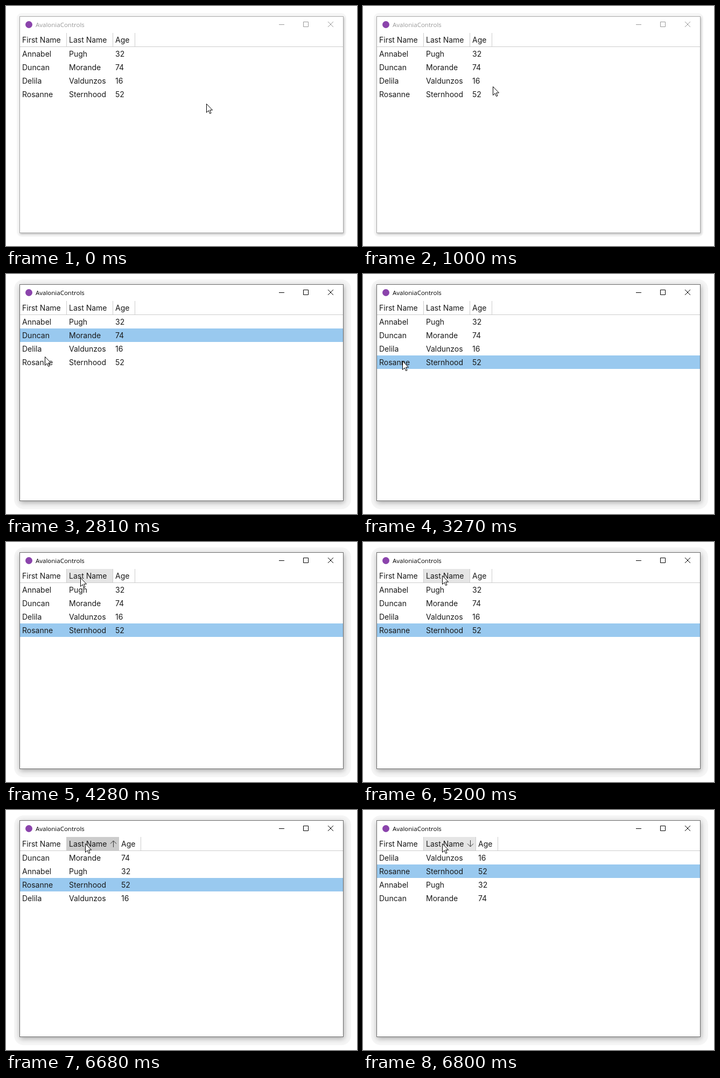
Write an HTML page that moves like this. It is 652 by 445 pixels and loops after 8 s.

```html
<!DOCTYPE html>
<html lang="en">
<head>
<meta charset="utf-8">
<title>Sortable grid</title>
<style>
  html, body { margin: 0; width: 652px; height: 445px; overflow: hidden; background: #fff; }
  div, svg { position: absolute; box-sizing: border-box; }
  #halo { left: 20px; top: 13px; width: 612px; height: 415px; border-radius: 9px; background: #f7f7f7; }
  #window { left: 25px; top: 19px; width: 602px; height: 402px; background: #fff;
    border: 1px solid #aaa; box-shadow: 1px 2px 4px rgba(0, 0, 0, .26); }
  .active #halo { left: 15px; top: 10px; width: 626px; height: 426px; border-radius: 18px; background: #f5f5f5; }
  .active #window { border-color: #6b6b6b; box-shadow: 1px 3px 9px rgba(0, 0, 0, .32); }
  svg { left: 0; top: 0; }
  text { font: 14px Inter, sans-serif; fill: #1a1a1a; white-space: pre; }
  #title { font: 11.5px "Open Sans", "Noto Sans", sans-serif; fill: #999; }
  #buttons { fill: none; stroke: #999; }
  .active #title { fill: #000; }
  .active #buttons { stroke: #000; }
  .line { fill: #ccc; }
  #arrow { fill: none; stroke: #333; }
</style>
</head>
<body>
<div id="halo"></div>
<div id="window"></div>
<svg width="652" height="445">
  <circle cx="42.5" cy="34.5" r="6.5" fill="#8b44ac"/>
  <text id="title" x="55" y="39">AvaloniaControls</text>
  <path id="buttons" d="M507 34.5h10M552.5 29.5h9v9h-9zM598 29l10 10m0-10l-10 10"/>
  <rect id="hover" x="113" y="50" height="25"/>
  <rect class="line" x="26" y="75" width="600" height="1"/>
  <rect class="line" x="112" y="50" width="1" height="25"/>
  <text x="30" y="68">First Name</text>
  <text x="117" y="68">Last Name</text>
  <g id="age">
    <rect class="line" x="198" y="50" width="1" height="25"/>
    <rect class="line" x="239" y="50" width="1" height="25"/>
    <text x="203" y="68">Age</text>
  </g>
  <path id="arrow" d="M199.500 57v12M194 62.500l5.500-5.500 5.500 5.500"/>
  <g id="rows"></g>
  <path id="cursor" fill="#fff" stroke="#000" d="M.5.5V16.500L4.200 12.900 6.600 18.500 9 17.500 6.600 12H11.500Z"/>
</svg>
<script>
const LOOP = 8000;
const people = [
  ["Annabel", "Pugh", 32],
  ["Duncan", "Morande", 74],
  ["Delila", "Valdunzos", 16],
  ["Rosanne", "Sternhood", 52]
];
const $ = id => document.getElementById(id);
const smooth = p => p * p * (3 - 2 * p);
const out = p => p * (2 - p);

// Pointer moves: start, end, steps, x, y, easing
const moves = [
  [600, 600, 1, 372, 184, out],
  [660, 1360, 13, 76, 105, smooth],
  [1420, 1480, 2, 75, 102, out],
  [1720, 1960, 4, 71, 111, out],
  [2520, 3040, 10, 72, 161, out],
  [3220, 3220, 1, 73, 161, out],
  [3460, 4230, 14, 137, 66, smooth],
  [4280, 4280, 1, 138, 66, out],
  [4970, 5200, 5, 147, 62, out]
];

$("rows").innerHTML = people.map(([first, last, age]) => `<g>
  <rect x="26" width="600" height="25" fill="#99c9ef"/>
  <text x="30" y="18">${first}</text>
  <text x="117" y="18">${last}</text>
  <text y="18">${age}</text></g>`).join("");
const rows = [...$("rows").children];

function pointer(t) {
  let x = 372, y = 181;
  for (const [start, end, steps, toX, toY, ease] of moves) {
    if (t < start) break;
    const done = end > start ? Math.min(1, (t - start) / (end - start)) : 1;
    const p = ease((Math.floor(done * (steps - 1) + 1e-6) + 1) / steps);
    x += (toX - x) * p;
    y += (toY - y) * p;
  }
  return [Math.round(x), Math.round(y)];
}

const show = (el, on) => el.setAttribute("visibility", on ? "visible" : "hidden");
const place = (el, x, y) => el.setAttribute("transform", `translate(${x} ${y})`);
const within = (t, start, end) => t >= start && t < end;

function draw(t) {
  const [x, y] = pointer(t);
  const sorted = t >= 5560, descending = t >= 6800;
  const shift = sorted ? 11 : 0;
  const order = descending ? [2, 3, 0, 1] : sorted ? [1, 0, 3, 2] : [0, 1, 2, 3];
  const selected = t >= 3270 ? 3 : t >= 2270 ? 1 : -1;
  const pressed = within(t, 5440, 5560) || within(t, 6680, 6800);

  document.body.className = t >= 2210 ? "active" : "";
  place($("cursor"), x, y);
  place($("age"), shift, 0);
  show($("hover"), x > 112 && x < 199 && y < 75);
  $("hover").setAttribute("width", 85 + shift);
  $("hover").setAttribute("fill", pressed ? "#ccc" : "#e5e5e5");
  show($("arrow"), sorted);
  $("arrow").setAttribute("transform", descending ? "rotate(180 199.5 62.5)" : "");

  order.forEach((person, slot) => {
    const row = rows[person];
    place(row, 0, 76 + 25 * slot);
    show(row.firstElementChild, person === selected);
    row.lastElementChild.setAttribute("x", 203 + shift);
  });
}

const began = performance.now();
function tick() {
  draw((performance.now() - began) % LOOP);
  requestAnimationFrame(tick);
}
tick();
</script>
</body>
</html>
```
